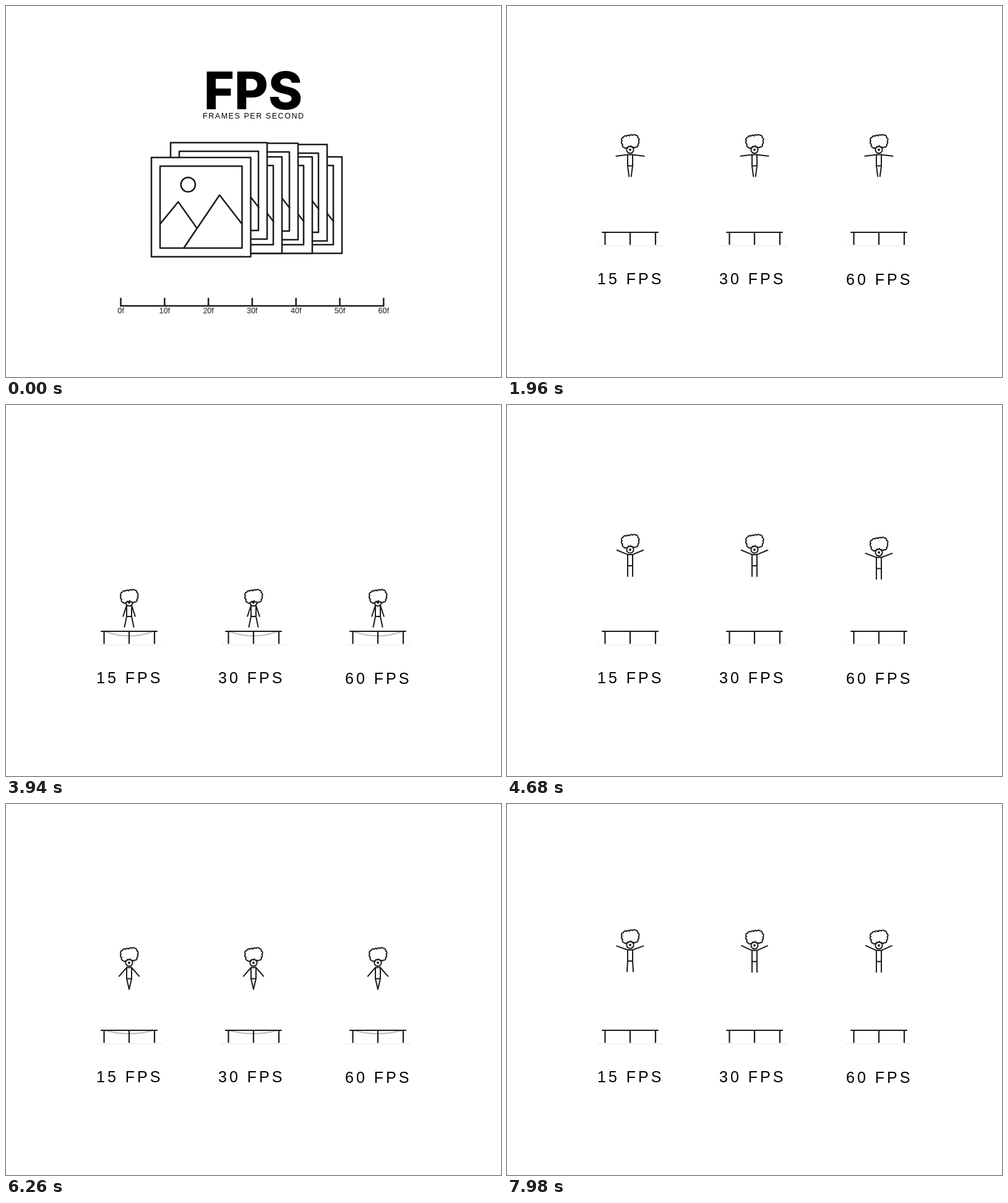
An HTML page with a canvas that plays this animation: 800 px wide and 600 px high, repeating every 8000 ms.

```html
<!DOCTYPE html>
<html lang="en">
<head>
<meta charset="utf-8">
<title>Frames per second</title>
<style>
  html, body { margin: 0; width: 100%; height: 100%; overflow: hidden; background: #fff; }
  canvas { display: block; }
</style>
</head>
<body>
<canvas id="stage" width="800" height="600"></canvas>
<script>
const ctx = document.getElementById('stage').getContext('2d');
const INK = '#1f1b1c', MAT_Y = 366, PERIOD = 56, FIRST_LANDING = 83;
const SANS = '"Liberation Sans", Arial, sans-serif';

// One bounce, in ticks after the lowest point: [tick, shoulder y, hair rise, arm angle, foot spread]
const BOUNCE = [
  [0, 339, 25, 74, 5], [3, 324, 27, 72, 7.5], [7, 264.5, 33.5, 49, 0],
  [11, 248, 34, 27, 4], [16, 239.5, 34, 3, 1.5], [22, 235.8, 34, -10, 2],
  [28, 235, 34, -16, 5], [35, 236, 34, -20, 5], [37, 236.8, 34, -24, 4],
  [44, 271, 34, -10, 4], [51, 326, 31, 40, 4], [54, 336.5, 25, 68, 4], [56, 339, 25, 74, 5]
];
const SAG = [[0, 0], [2, 8], [3, 7.5], [7, 5.5], [11, 0], [56, 0]];
const HAIR = [[-11, 6], [-6, 4], [-1, 3.5], [4, 2.5], [9, 2.5], [12.5, 6.5], [13.5, 12], [12.5, 17],
  [9, 21.5], [4.5, 21.5], [1, 19.5], [-3, 20.5], [-6, 23], [-10, 22], [-12, 17], [-13, 11.5]];

const hairPath = new Path2D('M' + HAIR[0] +
  HAIR.slice(1).concat([HAIR[0]]).map(p => `A3.2 3.2 0 0 1 ${p}`).join('') + 'Z');

const clamp = v => Math.max(0, Math.min(1, v));
const easeInOut = u => u < .5 ? 4 * u ** 3 : 1 - (2 - 2 * u) ** 3 / 2;

// Smooth curve through the rows of a table, for one column
function sample(rows, x, col) {
  let i = 0;
  while (i < rows.length - 2 && x >= rows[i + 1][0]) i++;
  const slope = j => {
    if (j === 0 || j === rows.length - 1) return 0;
    const a = rows[j - 1], b = rows[j], c = rows[j + 1];
    const before = (b[col] - a[col]) / (b[0] - a[0]), after = (c[col] - b[col]) / (c[0] - b[0]);
    return before * after <= 0 ? 0 : 2 * before * after / (before + after);
  };
  const a = rows[i], b = rows[i + 1], w = b[0] - a[0], u = (x - a[0]) / w;
  return a[col] + (b[col] - a[col]) * u * u * (3 - 2 * u) +
    w * u * (1 - u) * (slope(i) * (1 - u) - slope(i + 1) * u);
}

function line(...pts) {
  ctx.beginPath();
  for (let i = 0; i < pts.length; i += 2) ctx.lineTo(pts[i], pts[i + 1]);
  ctx.stroke();
}

function disc(x, y, r, paint = 'stroke') {
  ctx.beginPath();
  ctx.arc(x, y, r, 0, 2 * Math.PI);
  ctx[paint]();
}

function text(str, x, y, font, spacing = 0, align = 'left') {
  ctx.font = font;
  ctx.letterSpacing = spacing + 'px';
  ctx.textAlign = align;
  ctx.fillText(str, x, y);
}

function card(x, y, size) {
  const s = size / 161;
  ctx.save();
  ctx.translate(x, y);
  ctx.lineWidth = 2.5;
  ctx.fillStyle = '#fff';
  ctx.fillRect(0, 0, size, size);
  ctx.strokeRect(0, 0, size, size);
  ctx.strokeRect(14, 14, size - 28, size - 28);
  ctx.scale(s, s);
  disc(59.5, 44, 11.7);
  line(14, 108, 43.5, 72, 74, 115);
  line(53, 146, 110.5, 61, 147, 108);
  ctx.restore();
}

function titleScene(tick) {
  const shift = -640 * easeInOut(clamp(tick / 40));
  if (shift <= -640) return;
  ctx.save();
  ctx.translate(shift, 0);
  ctx.fillStyle = '#000';
  text('FPS', 399.5, 167, '800 84px Inter, sans-serif', 0, 'center');
  text('FRAMES PER SECOND', 318, 182, '12.5px ' + SANS, 1.55);

  [[387, 244], [363, 224], [339, 244], [316, 222], [290, 244], [266, 221]]
    .forEach(([x, y]) => card(x, y, 156));
  card(235, 245, 160.5);

  ctx.lineWidth = 2.5;
  line(185.5, 485, 610, 485);
  ctx.fillStyle = INK;
  for (let i = 0; i <= 6; i++) {
    const x = 185.5 + i * 70.8;
    line(x, 473, x, 485);
    text(i * 10 + 'f', x, 497, '12.5px ' + SANS, 0, 'center');
  }
  ctx.restore();
}

function label(str, x, y, tick) {
  ctx.fillStyle = '#000';
  const font = '25px ' + SANS;
  for (let i = 0; i < str.length; i++) {
    ctx.globalAlpha = clamp((tick - 33 - i * 1.2) / 8);
    ctx.font = font;
    ctx.letterSpacing = '4px';
    text(str[i], x + ctx.measureText(str.slice(0, i)).width, y, font, 4);
  }
  ctx.globalAlpha = 1;
}

function trampoline(tick) {
  if (tick < 42) return;
  ctx.lineWidth = 1.5;
  ctx.strokeStyle = '#f1f0f1';
  const ground = 53 + 9 * clamp((62 - tick) / 4);
  ctx.globalAlpha = clamp((tick - 44) / 8);
  line(-ground, 388, ground, 388);
  ctx.globalAlpha = 1;

  const sag = tick < FIRST_LANDING ? 0 : sample(SAG, (tick - FIRST_LANDING) % PERIOD, 1);
  ctx.lineWidth = 2;
  if (sag > .2) {
    ctx.strokeStyle = '#c1bbc4';
    ctx.beginPath();
    ctx.moveTo(-40, MAT_Y);
    ctx.quadraticCurveTo(0, MAT_Y + 2 * sag, 40, MAT_Y);
    ctx.stroke();
  }
  ctx.strokeStyle = INK;
  ctx.lineWidth = 2.2;
  line(-45, MAT_Y, -45 + 90 * clamp((tick - 41) / 8), MAT_Y);
  [[-40.5, 47], [41, 52], [0, 57]].forEach(([x, start]) => {
    const u = clamp((tick - start) / 6.7);
    if (!u) return;
    const angle = (1 - u) * 53 * Math.PI / 180, length = 19.5 * u;
    line(x, MAT_Y, x + length * Math.sin(angle), MAT_Y + length * Math.cos(angle));
  });
}

function jumper(tick) {
  if (tick < 62) return;
  const phase = (tick - FIRST_LANDING + PERIOD) % PERIOD;
  const entry = clamp((FIRST_LANDING - tick) / 22);
  const y = sample(BOUNCE, phase, 1) - 78 * entry ** 1.5;
  const rise = sample(BOUNCE, phase, 2);
  const arm = sample(BOUNCE, phase, 3) * Math.PI / 180;
  const foot = sample(BOUNCE, phase, 4);
  const faceY = y - 3.5 - (rise - 25) * .5;

  ctx.save();
  ctx.beginPath();
  ctx.rect(-60, 0, 120, MAT_Y);
  ctx.clip();
  ctx.globalAlpha = clamp((tick - 61) / 5);
  ctx.strokeStyle = INK;
  ctx.lineWidth = 2;
  ctx.strokeRect(-4, y, 8, 18);
  for (const side of [-1, 1]) {
    line(side * 4, y, side * (4 + 18.7 * Math.cos(arm)), y + 18.7 * Math.sin(arm));
    line(side * 4, y + 18, side * foot, y + 35);
  }
  ctx.fillStyle = '#fff';
  disc(0, faceY, 5.6, 'fill');
  disc(0, faceY, 5.6);
  ctx.fillStyle = INK;
  disc(0, faceY, 2, 'fill');
  ctx.translate(0, y - rise);
  ctx.fillStyle = '#fff';
  ctx.fill(hairPath);
  ctx.stroke(hairPath);
  ctx.restore();
}

const LANES = [
  { x: 199, hold: 4, name: '15 FPS', textX: 146, textY: 450 },
  { x: 400, hold: 2, name: '30 FPS', textX: 343, textY: 450 },
  { x: 601, hold: 1, name: '60 FPS', textX: 548, textY: 451 }
];

function draw(ms) {
  const frame = Math.floor(ms / 20 + 1e-6);
  const tick = frame + (frame >= 160 ? 1 : 0);
  ctx.fillStyle = '#fff';
  ctx.fillRect(0, 0, 800, 600);
  ctx.strokeStyle = INK;
  ctx.lineCap = ctx.lineJoin = 'round';
  titleScene(tick);
  for (const { x, hold, name, textX, textY } of LANES) {
    const held = Math.floor((tick - 2) / hold) * hold + 2;
    label(name, textX, textY, tick);
    ctx.save();
    ctx.translate(x, 0);
    jumper(held);
    trampoline(held);
    ctx.restore();
  }
}

const start = performance.now();
function loop() {
  draw((performance.now() - start) % 8000);
  requestAnimationFrame(loop);
}
loop();
</script>
</body>
</html>
```
